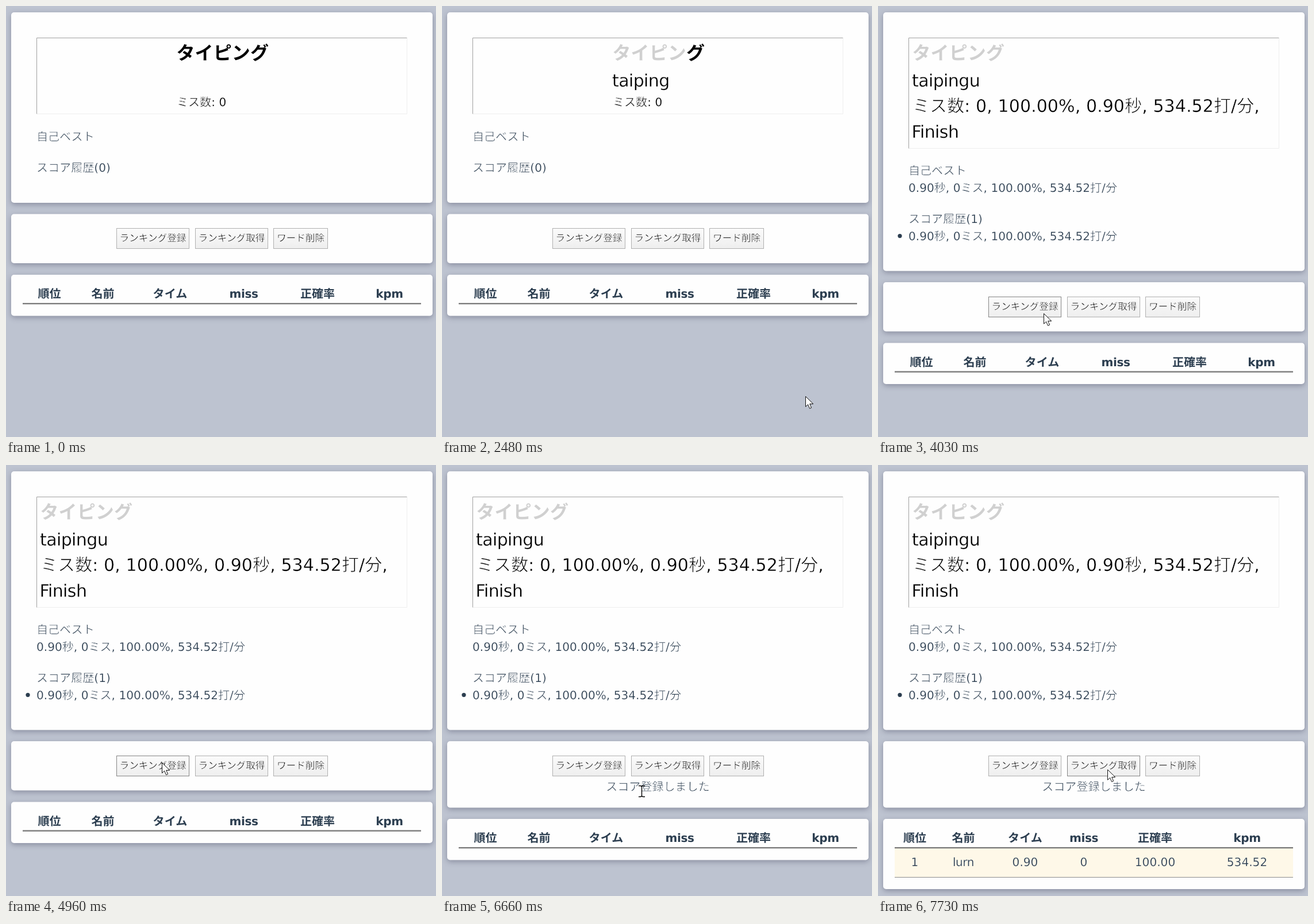
These frames come from a looping animation (748x749 px, 8000 ms). An HTML page:

```html
<!DOCTYPE html>
<html lang="ja">
<head>
<meta charset="utf-8">
<title>タイピング</title>
<style>
html, body { margin: 0; width: 100%; height: 100%; overflow: hidden; background: #bdc3d0; }
svg { display: block; width: 100vw; height: 100vh; }
/* A thin stroke in the card colour lightens the letters */
text {
  font: 20px "DejaVu Sans", "Noto Sans CJK JP", "Noto Sans CJK", sans-serif;
  letter-spacing: .003em; text-rendering: geometricPrecision;
  stroke: #fefefe; stroke-width: .012em;
}
.cjk { font-family: "Noto Sans CJK JP", "Noto Sans CJK", sans-serif; font-weight: 300; stroke-width: .03em; }
.abc { letter-spacing: -.02em; }
.bold, .bold .cjk { font-weight: 700; stroke: none; }
.card { fill: #fefefe; filter: drop-shadow(0 3px 5px rgba(20, 20, 50, .3)); }
</style>
</head>
<body>
<svg viewBox="0 0 748 749" preserveAspectRatio="none">
  <defs>
    <linearGradient id="face" x2="0" y2="1"><stop stop-color="#fbfbfb"/><stop offset="1" stop-color="#eee"/></linearGradient>
    <linearGradient id="down" x2="0" y2="1"><stop stop-color="#dadada"/><stop offset="1" stop-color="#eee"/></linearGradient>
  </defs>
  <g id="page"></g>
  <g id="pointer"></g>
</svg>
<script>
const LOOP = 8000, TICK = 76.4;
const KEYS = [1690, 1770, 1840, 2010, 2080, 2250, 2480, 2560];
const WORD = 'taipingu';
const KANA = [['タ', 2], ['イ', 3], ['ピ', 5], ['ン', 7], ['グ', 8]];
const BUTTONS = [
  { x: 192, w: 127, label: 'ランキング登録', press: [4810, 4960] },
  { x: 329, w: 127, label: 'ランキング取得', press: [7270, 7350] },
  { x: 465, w: 95, label: 'ワード削除', press: [0, 0] }
];
const HEADS = ['順位', '名前', 'タイム', 'miss', '正確率', 'kpm'];
const ROW = ['1', 'lurn', '0.90', '0', '100.00', '534.52'];
const WIDE = [75.5, 168.5, 285.5, 413.5, 542, 667];
const FILLED = [64, 148.5, 256, 358, 482, 642];

// Pointer strokes: time, x, y
const STROKES = [
  [[70, 637, 736], [150, 631, 702], [225, 622, 674], [300, 617, 662], [380, 619, 663], [500, 629, 674], [600, 632, 678]],
  [[3490, 622, 674], [3640, 530, 628], [3800, 400, 566], [3950, 305, 540], [4030, 287, 534], [4260, 276, 521], [4405, 271, 517]],
  [[6280, 273, 522], [6430, 300, 548], [6580, 334, 565], [6655, 346, 567], [6800, 368, 560], [6900, 385, 545], [7040, 396, 532], [7118, 399, 529]]
];

const page = document.getElementById('page');
const pointer = document.getElementById('pointer');

const rich = s => s.replace(/[^\x00-\x7f]+|[a-z]+/gi, m =>
  `<tspan class="${m.charCodeAt(0) > 127 ? 'cjk' : 'abc'}">${m}</tspan>`);

function text(x, y, s, { size = 20, fill = '#2c3e50', bold = false, mid = false } = {}) {
  return `<text x="${x}" y="${y}" class="${bold ? 'bold' : ''}" text-anchor="${mid ? 'middle' : 'start'}"` +
    ` style="font-size:${size}px;fill:${fill}">${rich(s)}</text>`;
}

const rect = (x, y, w, h, attrs) => `<rect x="${x}" y="${y}" width="${w}" height="${h}" ${attrs}/>`;
const card = (y, h) => rect(9, y, 733, h, 'rx="5" class="card"');
const inside = (p, b, y) => p && p[0] >= b.x && p[0] < b.x + b.w && p[1] >= y && p[1] < y + 36;

function pointerAt(t) {
  const stroke = STROKES.filter(s => t >= s[0][0]).pop();
  if (!stroke) return null;
  const t0 = stroke[0][0];
  const now = t0 + Math.floor((t - t0) / TICK + .02) * TICK;
  const i = stroke.findIndex(k => k[0] > now);
  if (i < 0) return stroke[stroke.length - 1].slice(1);
  const [a, b] = [stroke[i - 1], stroke[i]];
  const f = (now - a[0]) / (b[0] - a[0]);
  return [1, 2].map(n => Math.round(a[n] + (b[n] - a[n]) * f));
}

function typingBox(typed, done) {
  const x = done ? 59 : 296, bottom = done ? 247.5 : 187.5;
  const black = { size: 30, fill: '#000' };
  const kana = KANA.map(([c, n]) => `<tspan class="cjk" fill="${typed >= n ? '#d0d0d0' : '#000'}">${c}</tspan>`).join('');
  let out = `<path d="M53.5 ${bottom}V55.5H697.5" fill="none" stroke="#a0a0a0"/>` +
    `<path d="M54 ${bottom}H697.5V56" fill="none" stroke="#eee"/>` +
    `<text x="${x + .5}" y="93" class="bold" style="font-size:32px">${kana}</text>` +
    text(x, 140, WORD.slice(0, typed), black);
  if (done) {
    out += text(60, 184, 'ミス数: 0, 100.00%, 0.90秒, 534.52打/分,', black) + text(58.5, 229, 'Finish', black);
  } else {
    out += text(297, 174, 'ミス数: 0', { fill: '#000' });
  }
  return out;
}

function scores(done) {
  if (!done) return text(53, 234, '自己ベスト') + text(53, 288, 'スコア履歴(0)');
  const score = '0.90秒, 0ミス, 100.00%, 534.52打/分';
  return text(53, 293, '自己ベスト') + text(53, 323, score) +
    text(53, 377, 'スコア履歴(1)') + text(53, 407, score) +
    '<circle cx="38" cy="399.6" r="3.6" fill="#2c3e50"/>';
}

function button(b, y, t, p) {
  const pressed = t >= b.press[0] && t < b.press[1];
  const line = inside(p, b, y) ? '#858585' : '#b0b0b0';
  return rect(b.x + .5, y + .5, b.w - 1, 35, `fill="url(#${pressed ? 'down' : 'face'})" stroke="${line}"`) +
    text(b.x + b.w / 2, y + 23, b.label, { size: 16.6, fill: '#000', mid: true });
}

function table(y, filled) {
  const cols = filled ? FILLED : WIDE;
  let out = card(y, filled ? 122 : 71.5);
  if (filled) {
    out += rect(29, y + 51, 693, 50, 'fill="#fef8e8"') + rect(29, y + 101, 693, 1, 'fill="#8c8c8c"');
    out += ROW.map((s, i) => text(cols[i], y + 82, s, { mid: true })).join('');
  }
  return out + rect(29, y + 49, 693, 2.4, 'fill="#7d7d7d"') +
    HEADS.map((s, i) => text(cols[i], y + 40, s, { bold: true, mid: true })).join('');
}

function drawPointer(p, overText) {
  if (!p) return '';
  const shape = overText
    ? '<path d="M-5 -9.5H-1.5L.5 -8.5L2.5 -9.5H6M.5 -8.5V8.5M-5 9.5H-1.5L.5 8.5L2.5 9.5H6" fill="none" stroke="#000" stroke-width="1.4"/>'
    : '<path d="M.5 .5V18.3L4.6 14.5L7.6 21.5L10.6 20.2L7.7 13.5H13.8Z" fill="#fff" stroke="#111"/>';
  return `<g transform="translate(${p})">${shape}</g>`;
}

function put(node, html) {
  if (node.last !== html) node.innerHTML = node.last = html;
}

function draw(t) {
  const typed = KEYS.filter(k => t >= k).length;
  const done = typed === WORD.length;
  const saved = t >= 5270;
  const p = pointerAt(t);
  const top = done ? 480 : 361.5;
  const btnY = done ? 505 : 386;
  const overText = saved && p && p[0] > 286 && p[0] < 464 && p[1] > 546 && p[1] < 578;
  put(page,
    card(11, done ? 449.5 : 331) + card(top, saved ? 115.5 : 85.5) +
    table(saved ? 615 : done ? 585.5 : 467, t >= 7730) +
    typingBox(typed, done) + scores(done) +
    BUTTONS.map(b => button(b, btnY, t, p)).join('') +
    (saved ? text(375.5, 566, 'スコア登録しました', { mid: true }) : ''));
  put(pointer, drawPointer(p, overText));
}

const start = performance.now();
function frame() {
  draw((performance.now() - start) % LOOP);
  requestAnimationFrame(frame);
}
frame();
</script>
</body>
</html>
```
